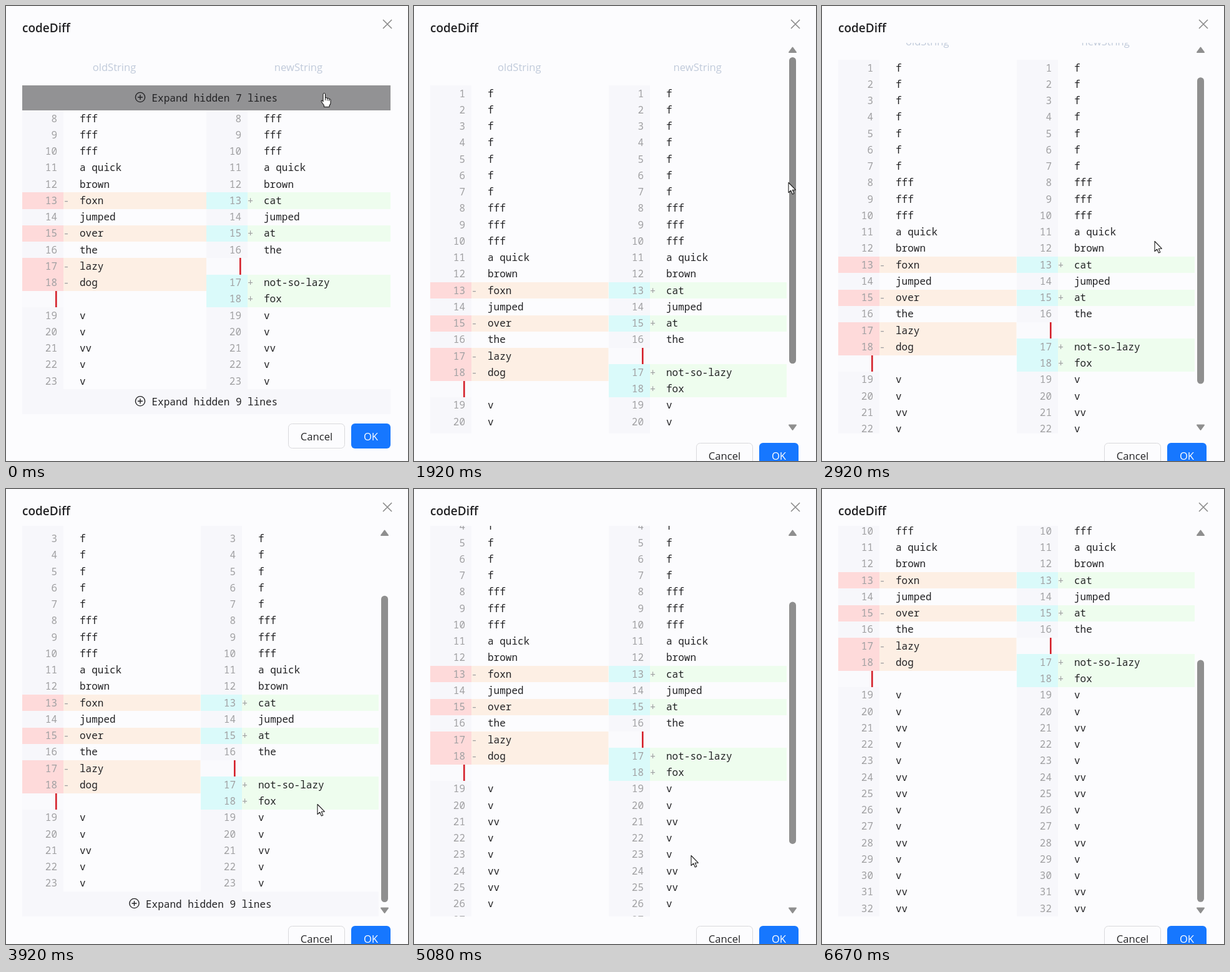
These frames come from a looping animation (644x728 px, 7660 ms). An HTML page with a canvas:

```html
<!DOCTYPE html>
<html>
<head>
<meta charset="utf-8">
<title>codeDiff</title>
<style>
html, body { margin: 0; width: 100%; height: 100%; overflow: hidden; background: #fcfcfe; }
canvas { display: block; }
</style>
</head>
<body>
<canvas id="stage" width="644" height="728"></canvas>
<script>
const ctx = document.getElementById('stage').getContext('2d');
const LOOP = 7660, FPS = 12;
const UI = '"Open Sans", "Noto Sans", sans-serif';
const MONO = '16px "Noto Sans Mono", "DejaVu Sans Mono", monospace';
const ROW = 26.25, BAR = 40, LEFT = 26, TOP = 59, BOTTOM = 684, HEAD = 68;
const C = {
  page: '#fcfcfe', ink: '#222224', num: '#a0a0a2', gutter: '#f7f7fb', empty: '#fafafd',
  delGutter: '#fedada', del: '#fdefe4', addGutter: '#dafafa', add: '#eefdee',
  label: '#c0cada', dark: '#929294', bar: '#8f8f8f', hover: '#8b8b8b', cross: '#8a8a8a',
  red: '#d4202a', border: '#d9d9dc', blue: '#1677ff'
};

// Each row: [old text, new text, changed]; null marks an empty side.
const same = s => s.split(',').map(t => [t, t, false]);
const rows = [
  ...same('f,f,f,f,f,f,f,fff,fff,fff,a quick,brown'),
  ['foxn', 'cat', true], ...same('jumped'), ['over', 'at', true], ...same('the'),
  ['lazy', null, true], ['dog', 'not-so-lazy', true], [null, 'fox', true],
  ...same('v,v,vv,v,v,vv,vv,v,v,vv,v,v,vv,vv')
];
const counts = [0, 0];
const lines = rows.map(r => [0, 1].map(i => r[i] === null ? 0 : ++counts[i]));

// Keys: [step, value, ...]
const pointerKeys = [
  [17, 509, 140], [23, 599.5, 282], [27, 602, 300], [35, 532.5, 376], [37, 528, 387],
  [42, 528, 387], [47, 498.5, 504], [51, 473, 650], [52, 470, 656], [56, 470, 656],
  [61, 443.5, 586], [66, 455, 594], [68, 468.5, 590], [76, 520, 558], [77, 556, 465],
  [78, 604, 335], [79, 632, 251]
];
const scrollKeys = [
  [33, 0], [35, 41], [36, 84], [37, 113], [59, 113], [61, 159], [65, 287], [66, 309]
];

function at(keys, k) {
  if (k <= keys[0][0]) return keys[0].slice(1);
  const i = keys.findIndex(p => p[0] >= k);
  if (i < 0) return keys[keys.length - 1].slice(1);
  const a = keys[i - 1], b = keys[i], u = (k - a[0]) / (b[0] - a[0]);
  return a.slice(1).map((v, j) => v + (b[j + 1] - v) * u);
}

function rect(x, y, w, h, color) {
  ctx.fillStyle = color;
  ctx.fillRect(x, y, w, h);
}

function text(s, x, y, font, color, align = 'left') {
  ctx.font = font;
  ctx.fillStyle = color;
  ctx.textAlign = align;
  ctx.fillText(s, x, y);
}

function round(x, y, w, h, r) {
  ctx.beginPath();
  ctx.roundRect(x, y, w, h, r);
}

function stroke(color, width, ...paths) {
  ctx.strokeStyle = color;
  ctx.lineWidth = width;
  ctx.beginPath();
  for (const [x1, y1, x2, y2] of paths) {
    ctx.moveTo(x1, y1);
    ctx.lineTo(x2, y2);
  }
  ctx.stroke();
}

function drawSide(row, i, side, x, y, w) {
  const top = Math.round(y), h = Math.round(y + ROW) - top;
  const base = y + ROW / 2 + 5.5;
  const value = rows[row][side];
  if (value === null) {
    rect(x, top, 66, h, C.empty);
    rect(x + 53, top, 2.6, h, C.red);
    return;
  }
  const changed = rows[row][2];
  const fill = side ? [C.addGutter, C.add] : [C.delGutter, C.del];
  rect(x, top, 66, h, changed ? fill[0] : C.gutter);
  if (changed) {
    rect(x + 66, top, w - 66, h, fill[1]);
    text(side ? '+' : '-', x + 70.5, base, MONO, C.num, 'center');
  }
  text(String(i), x + 56, base, MONO, C.num, 'right');
  text(value, x + 92, base, MONO, C.ink);
}

function drawExpand(n, y, w, dark) {
  const cx = LEFT + w / 2, ix = cx - 106, iy = y + 19;
  rect(LEFT, Math.round(y), w, BAR, dark ? C.dark : C.gutter);
  stroke(C.ink, 1.4, [ix - 4, iy, ix + 4, iy], [ix, iy - 4, ix, iy + 4]);
  ctx.beginPath();
  ctx.arc(ix, iy, 7.6, 0, 7);
  ctx.stroke();
  text(`Expand hidden ${n} lines`, cx - 87.5, y + 25.5, MONO, C.ink);
}

function drawScrollbar(scroll, total, hovered) {
  const track = 579;
  ctx.fillStyle = hovered ? C.hover : C.bar;
  round(601, 82 + track * scroll / total, 11, track * (BOTTOM - TOP) / total, 5.5);
  ctx.fill();
  ctx.fillStyle = ctx.strokeStyle = C.bar;
  ctx.lineWidth = 2;
  ctx.lineJoin = 'round';
  for (const [tip, base] of [[66.5, 74], [678, 670.5]]) {
    ctx.beginPath();
    ctx.moveTo(606.5, tip);
    ctx.lineTo(612, base);
    ctx.lineTo(601, base);
    ctx.closePath();
    ctx.fill();
    ctx.stroke();
  }
}

function drawFrame(y) {
  text('codeDiff', 26, 42, '600 19px ' + UI, C.ink);
  stroke(C.cross, 1.6, [604, 22, 618, 36], [618, 22, 604, 36]);
  const font = '16.6px ' + UI;
  round(452.5, y + .5, 90, 39, 6);
  ctx.strokeStyle = C.border;
  ctx.lineWidth = 1;
  ctx.stroke();
  text('Cancel', 497.5, y + 26.5, font, C.ink, 'center');
  round(553, y, 63, 40, 6);
  ctx.fillStyle = C.blue;
  ctx.fill();
  text('OK', 584.5, y + 26.5, font, '#fff', 'center');
}

const arrow = new Path2D('M.5 .5V16.5L4.2 13.1L6.8 19L9.3 17.9L6.8 12.2H11.8Z');
const hand = new Path2D('M3.5 14V2.5Q3.5 .5 5.2 .5Q7 .5 7 2.5V8Q9.5 7 10.2 8.8Q12.4 8 13 9.8' +
  'Q15.5 9.4 15.5 11.8V16Q15.5 19 13.5 20V22.5H5V20L.8 14.2Q.2 12.2 1.8 12Z');

function drawPointer(x, y, isHand) {
  ctx.save();
  ctx.translate(isHand ? x - 4.5 : x, isHand ? y - 1 : y);
  const shape = isHand ? hand : arrow;
  ctx.fillStyle = '#fff';
  ctx.strokeStyle = '#1c1c1c';
  ctx.lineWidth = 1.1;
  ctx.lineJoin = 'round';
  ctx.fill(shape);
  ctx.stroke(shape);
  if (isHand) stroke('#1c1c1c', 1, [7, 8, 7, 12], [10.2, 9, 10.2, 12.5], [13, 10, 13, 13]);
  ctx.restore();
}

function draw(k) {
  const openTop = k >= 13, openEnd = k >= 53;
  const w = openTop ? 571 : 590, half = w / 2;
  const first = openTop ? 0 : 7, last = openEnd ? rows.length : 24;
  const [px, py] = at(pointerKeys, k);
  const [scroll] = at(scrollKeys, k);
  rect(0, 0, 644, 728, C.page);

  ctx.save();
  ctx.beginPath();
  ctx.rect(LEFT, TOP, w, BOTTOM - TOP);
  ctx.clip();
  let y = TOP - scroll;
  ['oldString', 'newString'].forEach((s, i) =>
    text(s, LEFT + half * (i + .5), y + 45, '16.6px ' + UI, C.label, 'center'));
  y += HEAD;
  if (!openTop) {
    drawExpand(7, y, w, true);
    y += BAR;
  }
  for (let r = first; r < last; r++, y += ROW) {
    for (const side of [0, 1]) {
      drawSide(r, lines[r][side], side, Math.round(LEFT + half * side), y, half);
    }
  }
  const overEnd = openTop && !openEnd && py >= y && py < y + BAR;
  if (!openEnd) {
    drawExpand(9, y, w, overEnd);
    y += BAR;
  }
  ctx.restore();

  if (openTop) {
    const total = y + scroll - TOP;
    drawScrollbar(scroll, total, k < 80 && px > 598 && px < 614);
  }
  drawFrame(openTop ? 699 : 668);
  if (k < 80) drawPointer(px, py, k < 14 || overEnd || k === 53);
}

function tick(now) {
  const t = now % LOOP;
  draw(Math.floor((t + 4) * FPS / 1000));
  requestAnimationFrame(tick);
}
draw(0);
requestAnimationFrame(tick);
</script>
</body>
</html>
```
